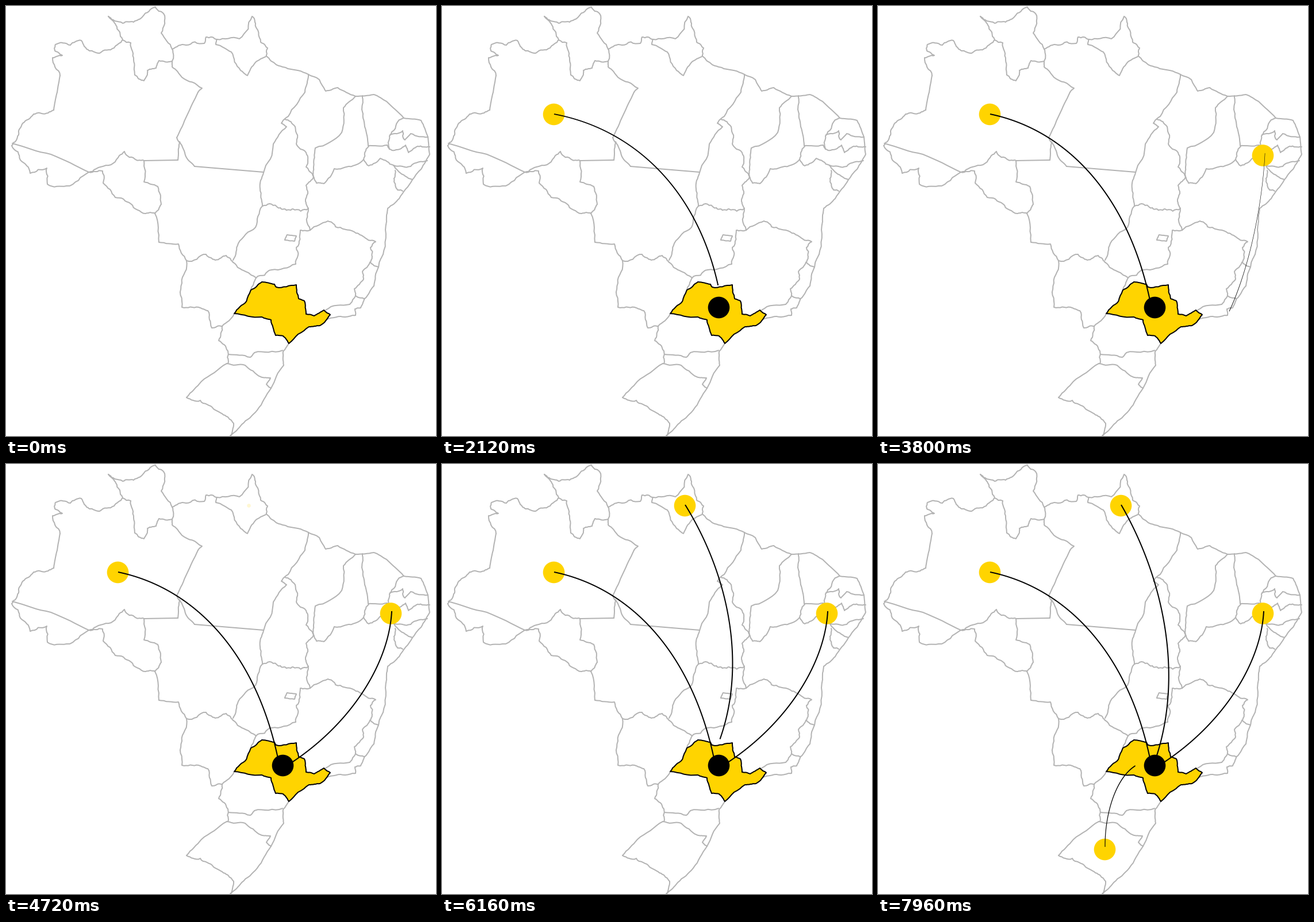
These frames come from a looping animation (748 by 748 pixels, 8 s). A matplotlib script:

```python
import numpy as np
import matplotlib.pyplot as plt
from matplotlib.animation import FuncAnimation
from matplotlib.patches import Circle, Polygon

SIZE, DPI = 748, 100
STEP, LOOP = 40, 8000
YELLOW, GREY, BLACK = "#ffd400", "#b3b3b3", "#000000"
PX = 72 / DPI
LINE = 2.0
RADIUS = 18.8

rng = np.random.default_rng(4)
fig = plt.figure(figsize=(SIZE / DPI, SIZE / DPI), dpi=DPI, facecolor="white")
ax = fig.add_axes([0, 0, 1, 1])
ax.set(xlim=(0, SIZE), ylim=(SIZE, 0))
ax.axis("off")


def roughen(xy, amount):
    """Turn a few key points into a natural border by midpoint displacement."""
    points = np.reshape(xy, (-1, 2)).astype(float)
    for _ in range(3):
        side = np.diff(points, axis=0)[:, ::-1] * [-1, 1]
        middle = (points[1:] + points[:-1]) / 2
        middle += side * rng.uniform(-amount, amount, (len(side), 1))
        points = np.insert(points, np.arange(1, len(points)), middle, axis=0)
    return points


def border(*xy, rough=0.13):
    ax.plot(*roughen(xy, rough).T, color=GREY, lw=LINE * PX, zorder=1,
            solid_joinstyle="round", solid_capstyle="round")


# North-west
border(289, 96, 289, 75, 270, 47, 274, 13, 260, 2, 238, 18, 222, 28, 203, 30, 178, 18)
border(178, 18, 191, 33, 203, 59, 217, 64, 222, 94, 224, 120, 240, 130, 246, 112,
       261, 108, 266, 95, 289, 96)
border(203, 59, 188, 73, 163, 82, 145, 78, 131, 60, 112, 68, 86, 67, 85, 78,
       98, 86, 81, 90, 94, 121)
border(94, 121, 89, 150, 83, 181, rough=0.02)
border(83, 181, 62, 187, 48, 188, 29, 204, 22, 224, 10, 243)
border(11, 239, 78, 258, 144, 289, rough=0.02)
border(10, 243, 25, 268, 42, 291, 71, 282, 72, 310, 105, 313, 144, 289)
border(144, 289, 157, 283, 190, 271, 206, 253, 227, 268, 240, 269)
border(240, 269, 299, 268, rough=0)
border(144, 289, 168, 287, 169, 308, 190, 333, 217, 344, 243, 361, 259, 360)
border(240, 269, 240, 306, 264, 314, 270, 345, 259, 361, rough=0.08)
border(259, 361, 266, 411, 300, 414, 314, 443, rough=0.08)

# North
border(289, 96, 289, 106, 306, 124, 341, 143, 334, 150, rough=0.08)
border(334, 150, 315, 190, 297, 229, rough=0.02)
border(297, 229, 302, 238, 299, 268, rough=0.08)
border(302, 236, 313, 262, 328, 279, rough=0.06)
border(328, 279, 448, 289, rough=0)
border(289, 75, 313, 68, 345, 65, 348, 54, 367, 58, 406, 57, 428, 18, 434, 30,
       443, 63, 455, 73, 453, 87)
border(367, 58, 365, 67, 392, 80, 408, 112, 420, 121, 434, 98, 453, 87, rough=0.08)

# Atlantic coast
border(453, 87, 470, 102, 490, 109, 526, 119, 545, 128, 556, 148, 577, 142,
       608, 157, rough=0.07)
border(608, 157, 640, 154, 662, 166, 692, 195, 722, 199, 734, 228, 737, 258,
       722, 284, 707, 302, rough=0.04)
border(707, 302, 684, 335, 664, 352, 662, 375, 656, 432, 648, 454, rough=0.06)
border(648, 454, 640, 487, 624, 509, 617, 525, 607, 527, 608, 538, 590, 541,
       558, 545, rough=0.08)

# North-east
border(526, 119, 520, 150, 491, 192, 479, 204, 488, 210, 465, 240, 448, 290,
       442, 318, 446, 348, rough=0.08)
border(485, 197, 503, 210, 505, 240, 522, 255, 522, 280, 535, 297)
border(608, 157, 587, 177, 584, 220, 538, 247, 535, 280, 535, 297, rough=0.08)
border(535, 297, 540, 308, 553, 309, 571, 283, 592, 280, 622, 267, 631, 244, rough=0.1)
border(620, 156, 619, 180, 624, 210, 630, 243, 663, 242, 667, 249, rough=0.07)
border(692, 195, 684, 198, 667, 226, 667, 249, rough=0.1)
border(667, 249, 685, 249, 695, 242, 700, 255, 716, 244, 737, 245)
border(668, 224, 690, 217, 694, 233, 704, 222, 734, 228)
border(622, 267, 631, 278, 651, 265, 674, 277, 704, 279, 733, 269)
border(707, 302, 683, 288, 674, 277, rough=0.08)
border(677, 286, 675, 305, 681, 320, 690, 322)

# Centre
border(535, 297, 522, 312, 521, 340, 526, 352, 529, 390)
border(446, 348, 471, 349, 484, 353, 499, 353, 526, 352, rough=0.25)
border(446, 348, 434, 385, 404, 413, 395, 442, rough=0.1)
border(395, 446, 413, 460, 435, 473, 426, 494, rough=0.1)
border(314, 443, 348, 432, 364, 442, 383, 434, 395, 446)
border(529, 390, 512, 390, 505, 420, 504, 449, 462, 459, 435, 473)
border(485, 407, 489, 398, 505, 400, 502, 409, 485, 407, rough=0.06)

# South-east
border(529, 390, 560, 374, 573, 384, 606, 393, 620, 400, 643, 410, 634, 420,
       637, 436, 633, 446)
border(648, 454, 633, 446, 620, 462, 622, 475, 606, 492, 608, 504, rough=0.1)
border(624, 509, 608, 504, 598, 519, 556, 529, rough=0.1)

# South
border(314, 443, 306, 482, 306, 524, 335, 524, 351, 530, 358, 560, 376, 557,
       397, 535, rough=0.1)
border(376, 557, 370, 582, 386, 600, 386, 622)
border(387, 606, 425, 611, 432, 603, 481, 599, rough=0.1)
border(492, 587, 482, 601, 483, 625, 461, 665, rough=0.06)
border(461, 665, 437, 703, 410, 728, 390, 748, rough=0.05)
border(384, 622, 416, 625, 443, 645, 460, 647, 453, 658, 461, 665, rough=0.08)
border(384, 622, 340, 653, 314, 681, rough=0.05)
border(314, 681, 338, 686, 361, 701, 381, 712, 396, 726, 390, 748)

state = (397, 535, 418, 514, 426, 494, 445, 480, 467, 484, 470, 489, 505, 485,
         509, 509, 519, 513, 522, 536, 536, 539, 553, 529, 564, 537, 546, 556,
         527, 558, 492, 587, 482, 574, 469, 573, 461, 546, 445, 541, 397, 535)
ax.add_patch(Polygon(roughen(state, 0.07), fc=YELLOW, ec=BLACK, lw=LINE * PX,
                     joinstyle="round", zorder=2))


class Dot:
    """A circle that grows and fades in."""

    def __init__(self, x, y, start, color=YELLOW, zorder=3):
        self.start = start
        self.patch = ax.add_patch(Circle((x, y), 0, fc=color, lw=0, zorder=zorder))

    def update(self, now):
        p = np.clip((now - self.start + STEP) / 520, 0, 1) ** 0.68
        self.patch.set_radius(RADIUS * p)
        self.patch.set_alpha(p)


class Arc:
    """A curved stroke stretched out from its start along one axis."""

    def __init__(self, points, axis, start, pivot=0):
        a, b, c, d = np.array(points, float)
        t = np.linspace(0, 1, 80)[:, None]
        u = 1 - t
        curve = u**3 * a + 3 * u * u * t * b + 3 * u * t * t * c + t**3 * d
        slope = np.gradient(curve, axis=0)
        normal = slope[:, ::-1] * [-1, 1] / np.hypot(*slope.T)[:, None]
        offset = LINE / 2 * normal
        self.outline = np.vstack([curve + offset, (curve - offset)[::-1]])
        self.axis = np.array(axis) / np.hypot(*axis)
        self.depth = (self.outline - a) @ self.axis - pivot
        self.start = start
        self.patch = ax.add_patch(Polygon(self.outline, fc=BLACK, lw=0, zorder=4))

    def update(self, now):
        s = np.clip((now - self.start) / 560, 0, 1)
        self.patch.set_visible(now >= self.start)
        self.patch.set_xy(self.outline - (1 - s) * np.outer(self.depth, self.axis))


parts = [
    Dot(194.5, 188.5, 720),
    Dot(481.5, 524.5, 720, BLACK, 5),
    Dot(669.5, 260, 2720),
    Dot(422.5, 72.5, 4720),
    Dot(394.5, 670.5, 6720),
    Arc([(195, 188), (330, 216), (441, 333), (477, 532)], (-0.07, 1), 1640),
    Arc([(671, 256), (666, 351), (595, 458), (488, 525)], (1, 0.05), 3640, 3),
    Arc([(423, 71), (500, 205), (530, 370), (484, 510)], (0.015, 1), 5640),
    Arc([(395, 666), (394, 608), (428, 546), (487, 525)], (1, 0), 7640),
]


def draw(frame):
    for part in parts:
        part.update(frame * STEP)
    return [part.patch for part in parts]


anim = FuncAnimation(fig, draw, frames=LOOP // STEP, interval=STEP,
                     repeat=True, repeat_delay=0)
plt.show()
```
